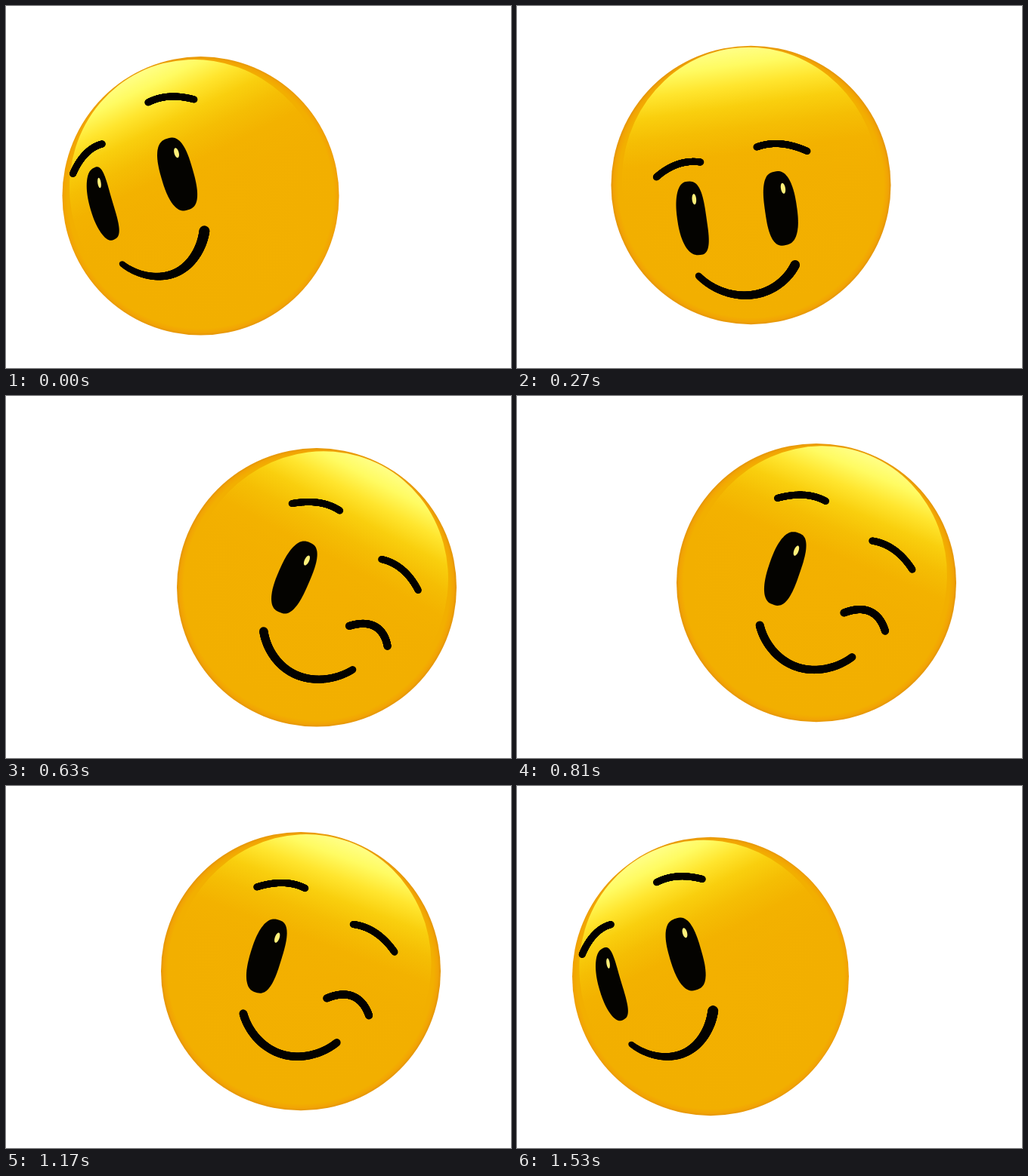
Animation, 668 px wide and 480 px high, one loop 1620 ms. Source, as an HTML page with a canvas:

```html
<!DOCTYPE html>
<html lang="en">
<head>
<meta charset="utf-8">
<title>Winking smiley</title>
<style>
html, body { margin: 0; width: 100%; height: 100%; overflow: hidden; background: #fff; }
canvas { display: block; width: 668px; height: 480px; }
</style>
</head>
<body>
<canvas id="stage" width="668" height="480"></canvas>
<script>
const ctx = document.getElementById('stage').getContext('2d');
const STEP = 90, STEPS = 18, R = 185;
const INK = '#040300';
const RAD = Math.PI / 180;

// Ball position over the loop: [step, x]
const path = [[0, 257.5], [3, 309.5], [5, 364.5], [7, 411], [9, 396], [12, 396], [13, 390], [15, 304], [17, 256]];

const bump = (s, center, width) => Math.exp(-(((s - center) / width) ** 2));

function slope(i) {
  const a = path[i - 1], b = path[i + 1];
  return a && b ? (b[1] - a[1]) / (b[0] - a[0]) : 0;
}

// Smooth cubic through the path points
function ballX(s) {
  const i = Math.max(0, path.findIndex(([at]) => at >= s) - 1);
  const [t0, x0] = path[i], [t1, x1] = path[i + 1];
  const d = t1 - t0, u = (s - t0) / d, v = 1 - u;
  return x0 + (x1 - x0) * u * u * (3 - 2 * u) + d * u * v * (slope(i) * v - slope(i + 1) * u);
}

// The head rolls and turns with its position; the way out adds a nod and a lead in the turn.
function poseAt(s) {
  const x = ballX(s);
  const swing = (x - 257) / 139;
  return {
    x, swing,
    y: 236 + .00285 * (x - 332) ** 2,
    roll: (x - 331.6) * .295,
    yaw: -25.5 + 30 * swing + 8 * bump(s, 4, 2),
    pitch: -13.5 + 12 * swing + 21 * bump(s, 3, 1.5),
    wink: s > 5 && s < 14
  };
}

// Longitude and latitude on the face (degrees, down is positive) to the plane of the head
function project(lon, lat, { yaw, pitch }) {
  const [a, b, p, q] = [lon, lat, pitch, yaw].map(v => v * RAD);
  const y = Math.sin(b), z = Math.cos(a) * Math.cos(b);
  const depth = z * Math.cos(p) - y * Math.sin(p);
  return [
    R * (Math.sin(a) * Math.cos(b) * Math.cos(q) + depth * Math.sin(q)),
    R * (y * Math.cos(p) + z * Math.sin(p))
  ];
}

function ellipse(x, y, rx, ry, fill) {
  ctx.beginPath();
  ctx.ellipse(x, y, rx, ry, 0, 0, Math.PI * 2);
  ctx.fillStyle = fill;
  ctx.fill();
}

function gradient(g, stops) {
  stops.forEach(([at, color]) => g.addColorStop(at, color));
  return g;
}

function drawBall({ x, roll }) {
  const rx = Math.min(R, 183 + (x - 257) / 25);
  ellipse(0, 0, rx, 184.7, gradient(ctx.createRadialGradient(0, -4, 0, 0, 0, R), [
    [0, '#f3b000'], [.95, '#f2af00'], [.98, '#f2a404'], [1, '#e39408']
  ]));
  ctx.save();
  ctx.rotate(roll * 1.2 * RAD);
  ellipse(0, -4, 170, 179, gradient(ctx.createLinearGradient(0, -184, 0, 10), [
    [0, '#ffff88'], [.12, '#fffb62'], [.26, '#ffe52e'], [.4, '#f9cf0e'],
    [.55, '#f5be04'], [.72, '#f3b200'], [1, 'rgba(243,176,0,0)']
  ]));
  ctx.restore();
}

// Brush stroke along a curve for k from -1 to 1, radius from r0 to r1
function brush(pose, curve, r0, r1 = r0) {
  for (let k = -1; k <= 1; k += .0125) {
    const r = r0 + (r1 - r0) * (k + 1) / 2;
    ellipse(...project(...curve(k), pose), r, r, INK);
  }
}

// Superellipse on the sphere
function patch(pose, lon, lat, w, h, power, fill) {
  const round = v => Math.sign(v) * Math.abs(v) ** (2 / power);
  ctx.beginPath();
  for (let a = 0; a < 360; a += 4) {
    ctx.lineTo(...project(lon + w * round(Math.cos(a * RAD)), lat + h * round(Math.sin(a * RAD)), pose));
  }
  ctx.fillStyle = fill;
  ctx.fill();
}

function drawEye(pose, side) {
  patch(pose, 19 * side, 0, 6.7, 15.8, 2.7, INK);
  patch(pose, 19 * side + 2.2, -8.4, .95, 2.2, 2, '#fff07a');
}

function drawBrow(pose, side) {
  const lat = -27.5 + .28 * side * pose.roll + .22 * pose.pitch;
  brush(pose, k => [side * (24.5 + 11.3 * k), lat + 3 * k + 2.5 * k * k], 4.5);
}

function drawMouth(pose) {
  const arc = 65 * RAD;
  const curve = k => [
    23 * Math.sin(k * arc) / Math.sin(arc),
    39.5 - 13.3 * (1 - Math.cos(k * arc)) / (1 - Math.cos(arc))
  ];
  brush(pose, curve, 3.7 + 1.8 * pose.swing, 7 - 2 * pose.swing);
}

function draw(s) {
  const pose = poseAt(s);
  ctx.fillStyle = '#fff';
  ctx.fillRect(0, 0, 668, 480);
  ctx.save();
  ctx.translate(pose.x, pose.y);
  drawBall(pose);
  ctx.rotate(pose.roll * RAD);
  drawBrow(pose, -1);
  drawBrow(pose, 1);
  drawEye(pose, -1);
  if (pose.wink) brush(pose, k => [21 + 10.5 * k, 5.4 + .7 * k + 4.8 * k * k], 5);
  else drawEye(pose, 1);
  drawMouth(pose);
  ctx.restore();
}

function tick() {
  draw(Math.floor(performance.now() / STEP) % STEPS);
  requestAnimationFrame(tick);
}
tick();
</script>
</body>
</html>
```
